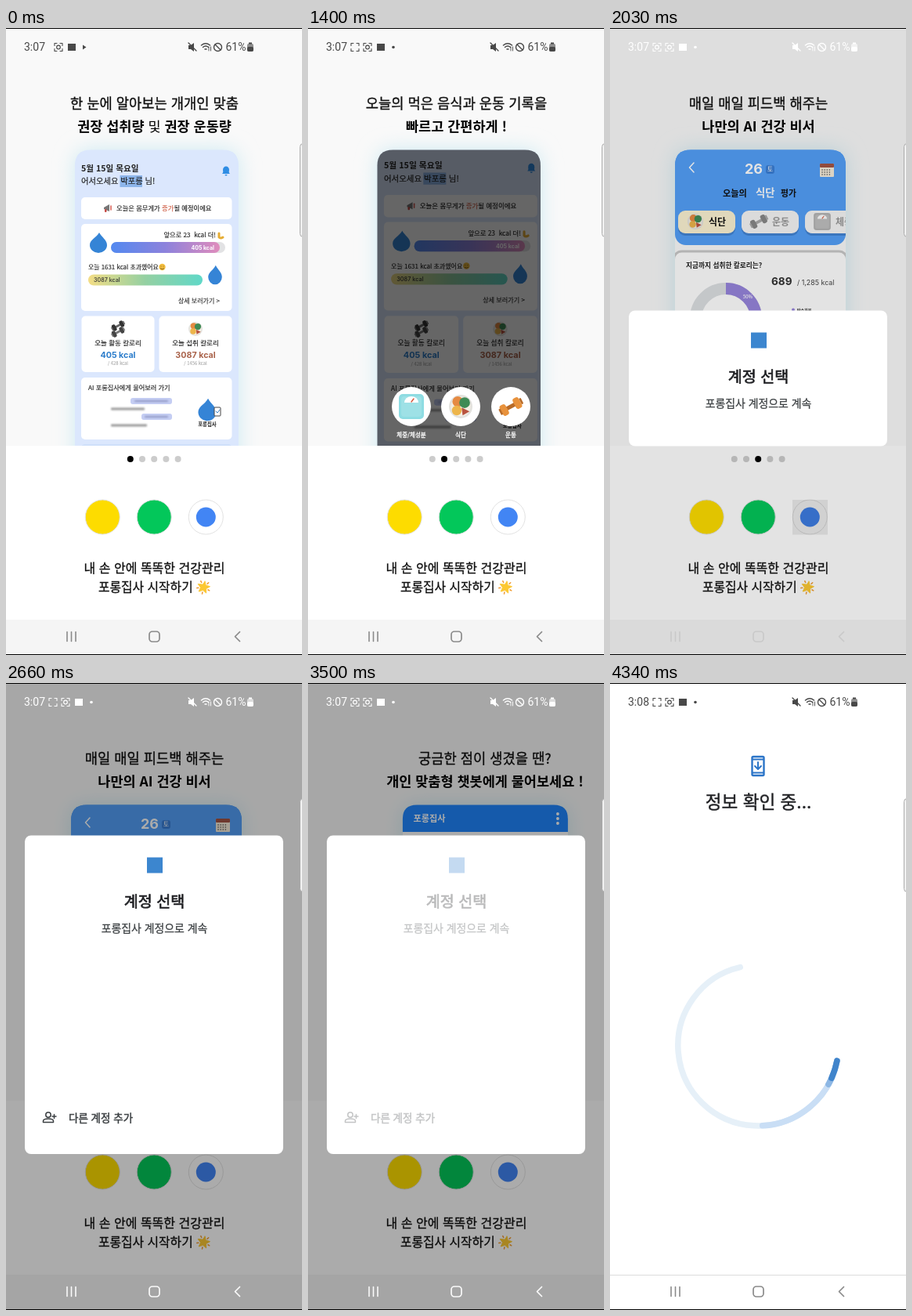
An HTML page for the animation above (4410 ms loop, 378 by 800 pixels).

```html
<!DOCTYPE html>
<html lang="ko">
<head>
<meta charset="utf-8">
<style>
html, body { margin: 0; height: 100%; overflow: hidden; background: #fff; }
svg { display: block; width: 378px; height: 800px; font-family: "Noto Sans CJK KR", "Noto Sans KR", "Noto Sans CJK", sans-serif; }
text { stroke-width: .018em; }
.medium { stroke-width: .035em; }
.roboto { font-family: Roboto, sans-serif; stroke: none; }
.number { font-family: Inter, sans-serif; stroke: none; }
[font-weight="700"] { stroke: none; }
</style>
</head>
<body>
<svg id="stage" viewBox="0 0 378 800"></svg>
<script>
const LOOP = 4410, APP = '포롱집사', USER = '박포롱';

// ---- markup helpers
const text = (x, y, size, str, fill = '#222', more = '') =>
  `<text x="${x}" y="${y}" font-size="${size}" fill="${fill}" stroke="${fill}" xml:space="preserve" ${more}>${str}</text>`;
const mid = (x, y, size, str, fill, more = '') => text(x, y, size, str, fill, 'text-anchor="middle" ' + more);
const rect = (x, y, w, h, r, fill, more = '') =>
  `<rect x="${x}" y="${y}" width="${w}" height="${h}" rx="${r}" fill="${fill}" ${more}/>`;
const circle = (x, y, r, fill, more = '') => `<circle cx="${x}" cy="${y}" r="${r}" fill="${fill}" ${more}/>`;
const path = (d, fill, more = '') => `<path d="${d}" fill="${fill}" ${more}/>`;
const line = (d, color, w, more = '') =>
  `<path d="${d}" fill="none" stroke="${color}" stroke-width="${w}" stroke-linecap="round" stroke-linejoin="round" ${more}/>`;
const at = (x, y, body, more = '') => `<g transform="translate(${x} ${y}) ${more}">${body}</g>`;
const BOLD = 'font-weight="700"', MEDIUM = 'class="medium"', NUMBER = 'class="number" ' + BOLD;
const gradient = (id, ...colors) => `<linearGradient id="${id}">${colors.map((c, i) =>
  `<stop offset="${i / (colors.length - 1)}" stop-color="${c}"/>`).join('')}</linearGradient>`;
const topRound = (x, y, w, h, r) =>
  `M${x} ${y + h}V${y + r}q0 ${-r} ${r} ${-r}h${w - 2 * r}q${r} 0 ${r} ${r}V${y + h}z`;
const polar = (r, deg) => {
  const a = deg * Math.PI / 180;
  return (r * Math.cos(a)).toFixed(2) + ' ' + (r * Math.sin(a)).toFixed(2);
};

// ---- small pictures, drawn around 0,0
const dumbbell = (a, b) => `<g transform="rotate(-28)">${rect(-8, -2.4, 16, 4.8, 1, b)}` +
  [-13, 5].map(x => rect(x, -7, 8, 14, 3, a)).join('') +
  [-15, 13].map(x => rect(x, -4, 2.5, 8, 1, b)).join('') + '</g>';
const food = circle(0, 0, 12, '#e3e2de') + circle(0, 0, 10, '#f4efe4') + circle(-3, -5, 5.5, '#e58a42') +
  circle(4, -4, 5.5, '#3f8b55') + circle(-4, 4, 5, '#edb54b') + path('M1 1l8 4-7 4z', '#b9533f');
const scale = body => rect(-16, -16, 32, 32, 5, body) + rect(-13, -13, 26, 26, 4, '#fff', 'fill-opacity=".15"') +
  path('M-9-5a9 8 0 0 1 18 0z', '#fff') + line('M0-6l3-4', '#d6583f', 1.5);
const drop = path('M1-13C4-7 11-4 11 3A11 10 0 0 1-11 3C-11-4-3-6 1-13z', '#3584d6');
const star = () => {
  let d = '', rays = '';
  for (let i = 0; i < 10; i++) d += (i ? 'L' : 'M') + polar(i % 2 ? 3.8 : 8.2, i * 36 - 78);
  for (let i = 0; i < 5; i++) rays += `M${polar(6.5, i * 72 - 42)}L${polar(8.6, i * 72 - 42)}`;
  return line(rays, '#f09a32', 1.5) + path(d, '#fcc832', 'stroke="#fcc832" stroke-linejoin="round"');
};
const megaphone = path('M-5-1l7-4v9l-7-3z', '#777') + rect(-4, 1, 2.5, 4, 1, '#c54a45') + line('M4-3v5', '#d4584e', 1.5);
const bell = path('M-5 4c2-2 1-3 1-5 0-6 8-6 8 0 0 2-1 3 1 5zM-1.5 5h3a1.5 1.5 0 0 1-3 0z', '#2f8de4');

// ---- pages
const heading = (a, b) => mid(189.5, 103, 17.7, a, '#111') + mid(189.5, 132, 17.5, b, '#000', BOLD);
const glow = (x, w, fill) => path(topRound(x, 155.5, w, 420, 20), '#cdeaf2', 'filter="url(#blur)"') +
  path(topRound(x, 155.5, w, 420, 20), fill);

const card = (x, y, w, h) => rect(x, y, w, h, 5, '#fff');
const stat = (x, name, value, goal, color) => card(x - 46.5, 367.5, 93, 71.5) +
  mid(x, 405, 8.5, name) + mid(x, 420.5, 10.7, value, color, NUMBER) + mid(x, 430, 5.8, goal, '#aaa');
const home =
  text(96, 183, 10.6, '5월 15일 목요일', '#222', BOLD) +
  rect(145.5, 188, 28.5, 15, 0, '#8db5ea') + text(96, 199, 10.3, `어서오세요 ${USER} 님!`) + at(281, 182, bell) +
  card(96, 216, 192.5, 28) + at(130, 230, megaphone) +
  text(141, 233, 8.3, '오늘은 몸무게가 <tspan fill="#cf6048" stroke="#cf6048">증가</tspan>될 예정이에요') +
  card(96, 250, 192.5, 111) +
  text(268, 267, 8.2, '앞으로 23  kcal 더!', '#222', 'text-anchor="end"') +
  line('M272 262v5q2 2 5 0', '#e6ad35', 3) +
  rect(134, 273, 146, 14, 7, '#e2e2e4') + rect(134, 273, 139, 14, 7, 'url(#pinks)') +
  text(266, 282.7, 7, '405 kcal', '#fff', 'text-anchor="end" ' + NUMBER) + at(118, 274, drop) +
  text(105, 308, 7.9, '오늘 1631 kcal 초과했어요') + circle(199.5, 305, 4.2, '#f2bd3d') +
  line('M197.5 307q2 1.5 4 0M198 304h.1M201 304h.1', '#70501c', .9) +
  rect(105, 314.5, 146, 14, 7, 'url(#greens)') + text(112, 324.2, 7.2, '3087 kcal', '#333', 'class="number" font-weight="500"') +
  at(267, 315, drop, 'scale(.8 .95)') +
  text(273, 351, 8, '상세 보러가기 &gt;', '#333', 'text-anchor="end"') +
  stat(143, '오늘 활동 칼로리', '405 kcal', '/ 428 kcal', '#2c7dcb') +
  stat(242, '오늘 섭취 칼로리', '3087 kcal', '/ 1456 kcal', '#a9624a') +
  at(143, 380, dumbbell('#333', '#666'), 'scale(.6)') + at(143, 388, dumbbell('#444', '#777'), 'scale(.6)') +
  at(242, 384, food, 'scale(.75)') +
  card(96, 446, 192.5, 79) + text(105, 462, 8.2, `AI ${APP}에게 물어보러 가기`) +
  rect(159, 472, 53, 8, 3, '#c4cdf3') + rect(173, 492, 39, 8, 3, '#c4cdf3') +
  `<g filter="url(#soft)">${rect(164, 475, 43, 2, 1, '#8f97c4') + rect(177, 495, 30, 2, 1, '#8f97c4') +
  rect(134, 484.5, 43, 3, 1, '#999') + rect(134, 505.5, 46, 3, 1, '#999')}</g>` +
  at(257, 487, drop, 'scale(1.05 1.1)') + rect(266, 484, 8, 11, 1, '#fff', 'stroke="#444"') +
  line('M268 489l2 2 3-4', '#397fc2', 1) + mid(257, 508, 6.4, APP, '#222', BOLD);

const action = (x, name, icon) => circle(x, 483, 25, '#fff') + at(x, 483, icon) + mid(x, 522, 7.5, name, '#fff', MEDIUM);
const chip = (x, fill, icon, name, color) => rect(x, 235, 73, 30, 9, '#2d62a6', 'fill-opacity=".45"') +
  rect(x, 233, 73, 29, 9, fill) + at(x + 22, 247, icon) + text(x + 39, 251.5, 12, name, color, BOLD);

const pages = [
  heading('한 눈에 알아보는 개개인 맞춤', '권장 섭취량 <tspan font-weight="400">및</tspan> 권장 운동량') +
    glow(88, 209, '#dbe7fd') + home + rect(96, 531, 192.5, 8, 5, '#cfe0fa'),
  heading('오늘의 먹은 음식과 운동 기록을', '빠르고 간편하게 !') + glow(88.5, 208.5, '#dbe7fd') +
    at(-.73, -6.8, home, 'scale(1.0176)') + path(topRound(88.5, 155.5, 208.5, 420, 20), '#000', 'fill-opacity=".6"') +
    action(132, '체중/체성분', scale('#8edce2')) + action(195, '식단', at(0, 0, food, 'scale(1.25)')) +
    action(259, '운동', at(0, 0, dumbbell('#e8923c', '#b86b28'), 'scale(1.05)')),
  heading('매일 매일 피드백 해주는', '나만의 AI 건강 비서') + glow(83, 218, '#fafafa') +
    `<g clip-path="url(#phone)">${rect(83, 155, 218, 122, 14, '#539ff8') + rect(83, 155, 218, 40, 0, '#539ff8') +
    line('M107 172l-5.5 6 5.5 6', '#fff', 1.5) + mid(183.5, 185.5, 18, '26', '#fff', NUMBER) +
    rect(199, 175, 11, 11, 3, '#3a7fd6') + mid(204.5, 183.2, 7.5, '토', '#fff') +
    rect(268, 173, 18, 17, 1, '#f7eddb') + rect(268, 173, 18, 5, 1, '#a35445') +
    line('M271 181h12M271 184h12M271 187h12', '#555', 1.6, 'stroke-dasharray=".1 3"') +
    text(144, 214.5, 11.2, '오늘의', '#111', BOLD) + text(186, 214.5, 13.3, '식단', '#fff', BOLD) +
    text(218, 214.5, 10.8, '평가', '#111', BOLD) +
    chip(87, '#fbf3d2', at(0, 0, food, 'scale(.85)'), '식단', '#111') +
    chip(168, '#f6f6f6', at(0, 0, dumbbell('#888', '#aaa'), 'scale(.8)'), '운동', '#999') +
    chip(249, '#f6f6f6', at(0, 0, scale('#b5b5b5'), 'scale(.68)'), '체중', '#999') +
    rect(81.5, 285, 221, 300, 10, '#fff', 'stroke="#c9c9c9" stroke-width="3"') +
    text(97, 306, 8.7, '지금까지 섭취한 칼로리는?', '#222', BOLD) +
    text(232.5, 327.5, 13.6, '689', '#333', 'text-anchor="end" ' + NUMBER) +
    text(286.5, 327.5, 8.9, '/ 1,285 kcal', '#444', 'text-anchor="end" class="number"')}
    ${circle(148, 371, 38.5, 'none', 'stroke="#dcdfe2" stroke-width="15"')}
    <path d="M148 332.5a38.5 38.5 0 0 1 0 77" fill="none" stroke="#9784dc" stroke-width="15"/>
    ${mid(176, 345, 6, '50%', '#fff') + circle(234, 359.5, 2, '#9784dc') + text(239, 361.5, 5, '탄수화물', '#222', BOLD)}</g>`,
  heading('궁금한 점이 생겼을 땐?', '개인 맞춤형 챗봇에게 물어보세요 !') + glow(84.5, 211, '#fff') +
    path(topRound(84.5, 155.5, 211, 34.5, 18), '#1f86ff') + text(98, 177, 11.2, APP, '#fff', BOLD) +
    [167, 173, 179].map(y => circle(282.5, y, 1.9, '#fff')).join('')
];

// ---- system bars
const capture = (x, id) => at(x, 24.5, line('M-5-2v-3h3M2-5h3v3M5 2v3h-3M-2 5h-3v-3', 'currentColor', 1.1) +
  `<circle id="${id}" r="2.3" fill="none" stroke="currentColor" stroke-width="1.2"/>`);
const status = `<g id="status">${text(23, 29.3, 14, '', 'currentColor', 'id="clock" class="roboto"')}
  <g id="extra">${capture(60, 'lens')}</g>
  <g id="notes">${capture(76, 'lens2') + rect(88, 20, 10, 9, 0, 'currentColor')}
  <g id="bullet">${circle(109, 24.5, 1.8, 'currentColor')}</g>
  <g id="arrow">${path('M107 21.5l4.5 3-4.5 3z', 'currentColor')}</g></g>
  ${path('M233 22h3l4-3v11l-4-3h-3z', 'currentColor') + line('M233 19l10 10', 'currentColor', 1.4)}
  ${line('M249.5 22q5.5-4.5 11 0M251.5 24.5q3.5-3 7 0M254 27h2', 'currentColor', 1.5)}
  ${line('M259 24v5M261.5 29v-5', 'currentColor', .9)}
  ${circle(270.5, 24.5, 5, 'none', 'stroke="currentColor" stroke-width="1.4"') + line('M267 21l7 7', 'currentColor', 1.4)}
  ${text(280.5, 29.3, 14, '61%', 'currentColor', 'class="roboto"')}
  ${rect(308, 20, 8, 10, 2, 'currentColor', 'fill-opacity=".6"') + rect(310, 18.5, 4, 2, 0, 'currentColor') + rect(308, 24, 8, 6, 2, 'currentColor')}</g>`;
const nav = `<g id="nav">${line('M78 770.5v12M83.5 770.5v12M89 770.5v12', 'currentColor', 1.6, 'stroke-linecap="butt"')}
  ${rect(183, 770, 13, 13, 4, 'none', 'stroke="currentColor" stroke-width="1.7"')}
  ${line('M298.5 770.5l-6 6 6 6', 'currentColor', 1.7)}</g>`;

// ---- scene
const button = (x, fill) => circle(x, 624, 22, fill, 'stroke="#e2e2e2"');
const arcs = [['#e6f0f8', 347, 1], ['#c9def5', 177, 1.5], ['#8db7e4', 119, 2.4], ['#4084cb', 114, 2.6]];
stage.innerHTML = `<defs>
  ${gradient('pinks', '#5389f0', '#8d82dc', '#e08cbc') + gradient('greens', '#f3dd85', '#94d0a2', '#60d8c8')}
  <filter id="blur" x="-30%" y="-30%" width="160%" height="160%"><feGaussianBlur stdDeviation="13"/></filter>
  <filter id="soft"><feGaussianBlur stdDeviation=".8"/></filter>
  <clipPath id="view"><rect width="378" height="533"/></clipPath>
  <clipPath id="phone">${path(topRound(83, 155.5, 218, 420, 20), '#000')}</clipPath></defs>
  ${rect(0, 0, 378, 800, 0, '#fff') + rect(0, 0, 378, 533, 0, '#f9f9f9')}
  <g clip-path="url(#view)"><g id="track">${pages.map((p, i) => at(i * 378, 0, p)).join('')}</g></g>
  <g id="dots">${[0, 1, 2, 3, 4].map(i => circle(158.8 + i * 15.2, 550, 4, '#ccc')).join('')}</g>
  ${button(123.3, '#fddc00') + button(189.2, '#03c75a') + button(255.3, '#fff')}
  ${circle(255.3, 624, 12.5, '#4285f4') + rect(233, 602, 45, 44.5, 0, '#000', 'id="press"')}
  ${mid(189.5, 695, 16, '내 손 안에 똑똑한 건강관리', '#111') + text(118, 719, 15.8, APP + ' 시작하기', '#111') + at(252.3, 713.5, star())}
  ${rect(0, 755, 378, 45, 0, '#f5f5f5') + rect(0, 0, 378, 800, 0, '#000', 'id="scrim"')}
  <g id="dialog">${rect(24, 0, 330, 173, 8, '#fff', 'id="sheet"')}<g id="content">
  ${rect(180, 28, 20, 20, 0, '#3c86cf') + mid(189.5, 91, 19.6, '계정 선택', '#202124', MEDIUM)}
  ${mid(189.5, 123, 13.9, APP + ' 계정으로 계속', '#3c4043')}
  <g id="more">${circle(54, 356.5, 3.2, 'none', 'stroke="#3c4043" stroke-width="1.5"')}
  ${line('M47.5 366v-1.5c0-4 13-4 13 0v1.5zM61.5 356v5M59 358.5h5', '#3c4043', 1.5)}
  ${text(80, 365, 13.5, '다른 계정 추가', '#3c4043', MEDIUM)}</g></g></g>
  <g id="loading">${rect(0, 0, 378, 800, 0, '#fff') + rect(0, 755, 378, 1, 0, '#dcdcdc')}
  ${rect(181.5, 94, 15, 24, 1.5, 'none', 'stroke="#2c75c8" stroke-width="2.4"')}
  ${line('M182 97.5h14M182 114.5h14M189 101v8.5M185 106l4 4 4-4', '#2c75c8', 2)}
  ${mid(189.5, 160, 22.6, '정보 확인 중...', '#202124')}
  <g id="ring">${arcs.map(a => line('', a[0], 7.5)).join('')}</g></g>
  ${status + nav + rect(375.5, 147.5, 9, 119, 4, '#f1f1f1', 'stroke="#aaa"')}
  ${rect(0, 0, 378, 1, 0, '#000') + rect(0, 799, 378, 1, 0, '#000')}`;

// ---- motion
const $ = id => document.getElementById(id);
const set = (id, name, value) => $(id).setAttribute(name, value);
const ramp = (t, a, b) => Math.min(1, Math.max(0, (t - a) / (b - a)));
const ease = p => p < .5 ? 2 * p * p : 1 - 2 * (1 - p) ** 2;
const slide = (t, a, b) => ease(ramp(t, a, b));
const gray = (from, to, p) => `rgb(${Array(3).fill(Math.round(from + (to - from) * p))})`;

function draw(t) {
  const page = slide(t, 140, 490) + slide(t, 1470, 1820) + slide(t, 3220, 3580);
  set('track', 'transform', `translate(${-378 * page} 0)`);
  [...$('dots').children].forEach((d, i) => d.setAttribute('fill', i === Math.round(page) ? '#000' : '#ccc'));
  set('press', 'opacity', t > 1900 && t < 2200 ? .08 : 0);

  const enter = ramp(t, 1960, 2170), grow = slide(t, 2240, 2520), load = ramp(t, 3640, 3850);
  set('scrim', 'opacity', .33 * enter);
  set('dialog', 'opacity', ramp(enter, 0, .3));
  set('dialog', 'transform', `translate(0 ${311 - 116.5 * grow + 113 * (1 - enter) ** 2})`);
  set('sheet', 'height', 173 + 233.5 * grow);
  set('more', 'opacity', ramp(grow, .8, 1));
  set('content', 'opacity', 1 - .7 * ramp(t, 3360, 3500));

  set('loading', 'opacity', load);
  const u = ramp(t, 3850, 4340), tail = 101 * u ** 3;
  [...$('ring').children].forEach((arc, i) => {
    const head = arcs[i][1] * u ** arcs[i][2];
    const [x0, y0, x1, y1] = [tail, head].flatMap(a => polar(102.5, a - 90).split(' '));
    arc.setAttribute('d', u ? `M${189.3 + +x0} ${462.5 + +y0}A102.5 102.5 0 ${head - tail > 180 ? 1 : 0} 1 ${189.3 + +x1} ${462.5 + +y1}` : '');
  });

  const shift = ramp(t, 70, 280), blink = t / 1430 % 1;
  set('notes', 'transform', `translate(${9 * (shift - 1)} 0)`);
  set('extra', 'opacity', shift);
  set('arrow', 'opacity', shift < 1 ? 1 : 0);
  set('bullet', 'opacity', shift < 1 ? 0 : 1);
  set('lens', 'opacity', ramp(blink, .15, .25) - ramp(blink, .65, .75));
  $('clock').textContent = load < 1 ? '3:07' : '3:08';
  set('status', 'color', enter && load < .5 ? '#fff' : '#484848');
  set('nav', 'color', load < .5 ? gray(138, 250, ramp(enter, 0, .6)) : '#8a8a8a');
}

function tick() {
  draw(performance.now() % LOOP);
  requestAnimationFrame(tick);
}
tick();
</script>
</body>
</html>
```
